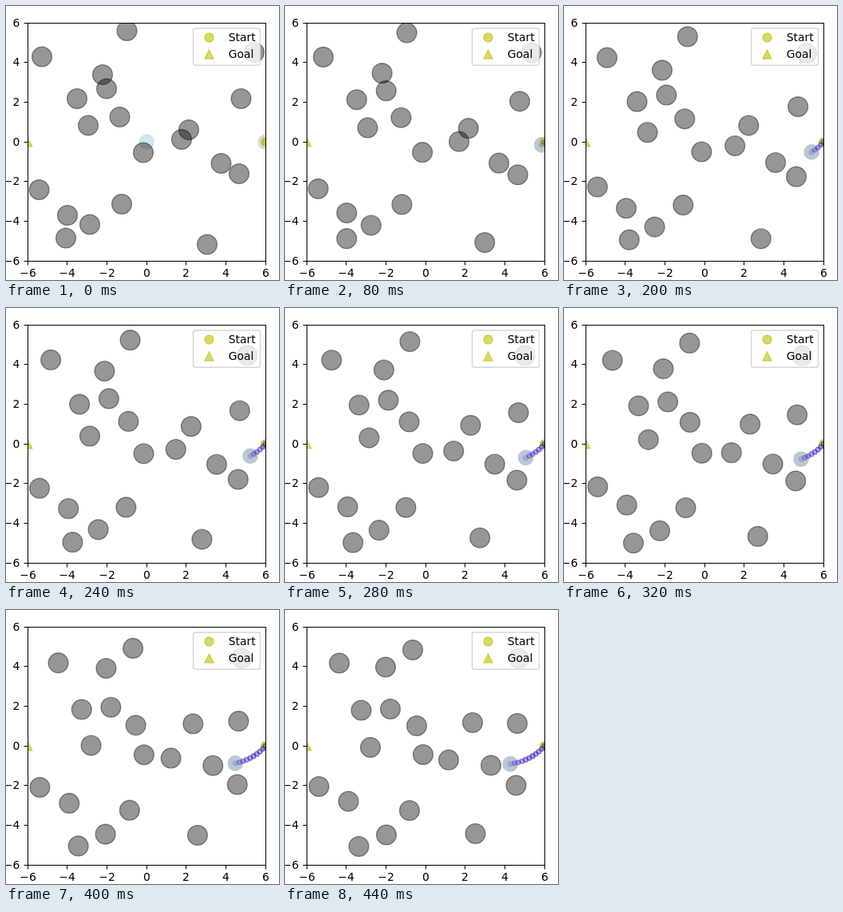
These frames come from a looping animation (342x343 px, 0.88 s). An HTML page:

```html
<!DOCTYPE html>
<html lang="en">
<head>
<meta charset="utf-8">
<title>Path planning among moving obstacles</title>
<style>
html, body { margin: 0; width: 100%; height: 100%; overflow: hidden; background: #fff; }
svg { display: block; width: 100vw; height: 100vh; }
text { font: 13.89px "DejaVu Sans", sans-serif; }
.obstacle { fill: #000; fill-opacity: .41; stroke: #000; stroke-opacity: .41; stroke-width: 1.39; }
.mark { fill: #bfbf00; fill-opacity: .6; stroke: #bfbf00; stroke-opacity: .6; stroke-width: 1.39; }
.trail { fill: #3a1fc0; stroke: #3a1fc0; stroke-width: 1.3; }
.axis { fill: none; stroke: #000; stroke-width: 1; }
</style>
</head>
<body>
<svg viewBox="0 0 342 343" preserveAspectRatio="none">
  <defs><clipPath id="plot"><rect x="27" y="21" width="298.5" height="298.5"/></clipPath></defs>
  <g clip-path="url(#plot)">
    <circle id="disc" r="9.8" fill="#add8e6" fill-opacity=".6"/>
    <circle id="robot" r="9.8" fill="#8e8a98" fill-opacity=".33"/>
    <g id="obstacles"></g>
    <circle class="mark" cx="325.3" cy="170.2" r="5.5" style="fill-opacity:.8"/>
    <path class="mark" d="M27.2 164.7l5.55 11.1h-11.1z"/>
    <g id="trail"></g>
  </g>
  <g id="axes"><rect class="axis" x="27.5" y="21.5" width="298" height="298"/></g>
  <rect x="234.5" y="28" width="84" height="46.3" rx="2.8" fill="#fff" fill-opacity=".8" stroke="#ccc" stroke-opacity=".8" stroke-width="1.39"/>
  <circle class="mark" cx="254.5" cy="39.5" r="5.5"/>
  <path class="mark" d="M254.5 55l5.55 11.1h-11.1z"/>
  <text x="278.7" y="44">Start</text>
  <text x="278.7" y="65">Goal</text>
</svg>
<script>
const STEP = 40, LAST = 11, LOOP = 880;
const $ = id => document.getElementById(id);

function add(parent, tag, attrs, text) {
  const el = document.createElementNS("http://www.w3.org/2000/svg", tag);
  for (const name in attrs) el.setAttribute(name, attrs[name]);
  if (text) el.textContent = text;
  return parent.appendChild(el);
}

function move(el, [x, y]) {
  el.setAttribute("cx", x);
  el.setAttribute("cy", y);
}

// Where each obstacle starts and ends: x, y, x, y.
const drifts = [
  [151.5, 31, 160, 50], [45, 63.5, 68, 66.5], [121, 86, 126, 71.5], [126, 103.5, 132, 124],
  [89, 116, 95.5, 125.5], [142.5, 139, 165, 145], [103, 149.5, 107, 172], [172, 183.5, 173, 181],
  [220, 167, 205, 187.7], [229, 155, 235, 141], [269.5, 197, 258, 194.5], [292, 210, 289.5, 219.5],
  [294.5, 116, 291, 142], [311, 58, 293, 60.5], [41.5, 230, 42.5, 221], [77, 262, 79.5, 239.5],
  [75, 290.5, 92.5, 296], [105, 273.5, 127, 281.5], [145, 248, 156, 251], [252, 298.5, 238.5, 280]
];

function drift([x, y, x2, y2], k) {
  const u = (k / LAST) ** 1.2;
  return [x + (x2 - x) * u, y + (y2 - y) * u];
}

// The robot leaves after one step and curves to the left.
function route(k) {
  const n = Math.max(0, k - 1);
  return [325.2 - 3.4 * n - 0.09 * n * n, 170.2 + 3.8 * n - 0.155 * n * n];
}

for (let v = -6; v <= 6; v += 2) {
  const x = Math.floor(176.2 + v * 24.85) + 0.5;
  const y = Math.floor(170.2 - v * 24.85) + 0.5;
  const label = String(v).replace("-", "\u2212");
  add($("axes"), "path", { class: "axis", d: `M${x} 319.5v5M27.5 ${y}h-5` });
  add($("axes"), "text", { x, y: 339, "text-anchor": "middle" }, label);
  add($("axes"), "text", { x: 17.3, y: y + 4.5, "text-anchor": "end" }, label);
}

const obstacles = drifts.map(() => add($("obstacles"), "circle", { class: "obstacle", r: 12.4 }));
const trail = Array.from({ length: LAST }, (_, i) => {
  const dot = add($("trail"), "circle", { class: "trail", r: 2.9 });
  move(dot, route(i + 1));
  return dot;
});

function draw(time) {
  const k = Math.min(LAST, Math.floor(time % LOOP / STEP));
  obstacles.forEach((el, i) => move(el, drift(drifts[i], k)));
  move($("robot"), route(k));
  move($("disc"), k ? route(k) : [176.2, 170.2]);
  // Dots darken as they are drawn over again.
  trail.forEach((dot, i) => {
    const ink = i < k ? 1 - 0.84 ** (k - i) : 0;
    dot.setAttribute("fill-opacity", Math.min(ink, 0.38));
    dot.setAttribute("stroke-opacity", Math.min(ink, 0.6));
  });
}

let start;
function tick(now) {
  start ??= now;
  draw(now - start);
  requestAnimationFrame(tick);
}
draw(0);
requestAnimationFrame(tick);
</script>
</body>
</html>
```
